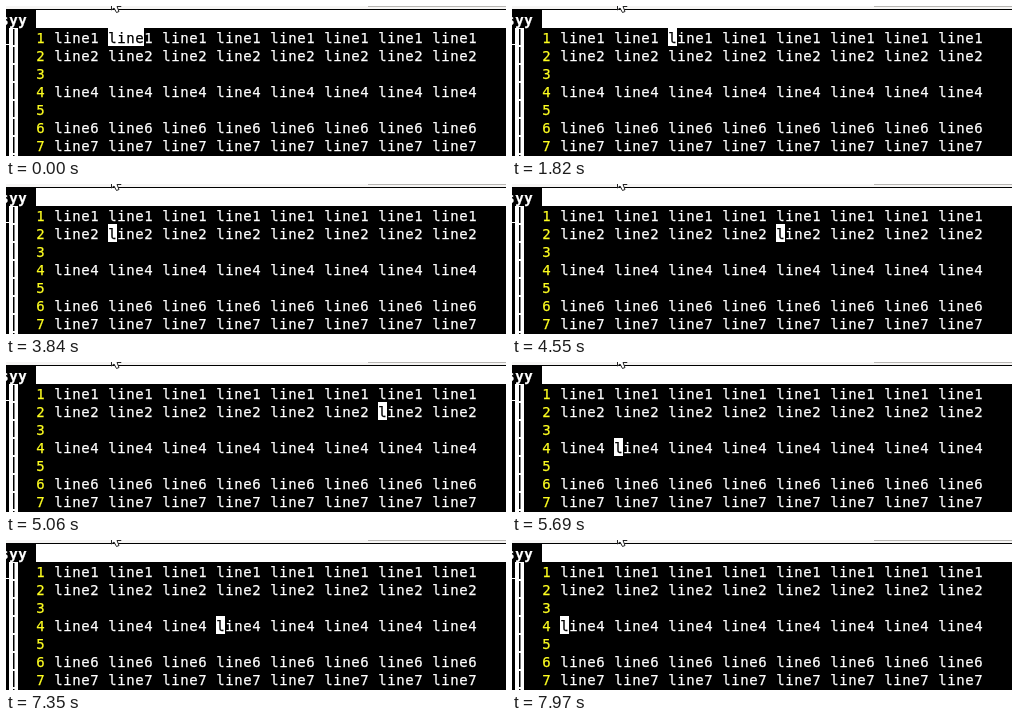
An HTML page with a canvas for the animation above (8 s loop, 500 px wide and 150 px high).

```html
<!DOCTYPE html>
<html lang="en">
<head>
<meta charset="utf-8">
<title>Word motions in a terminal editor</title>
<style>
  html, body { margin: 0; width: 100%; height: 100%; overflow: hidden; background: #000; }
  canvas { display: block; }
</style>
</head>
<body>
<canvas id="stage" width="500" height="150"></canvas>
<script>
const ctx = document.getElementById('stage').getContext('2d');
const LOOP = 8000, CELL = 9, ROW = 18, LEFT = 48, TOP = 22, BASE = 15;
const FONT = '14px "DejaVu Sans Mono", monospace';
const WORDS = 8, WORD_WIDTH = 6 * CELL;
const filledLines = [1, 2, 4, 6, 7];

// Key points [ms, word index]; the cursor steps evenly between them.
const keys = [
  [0, 1], [1820, 2], [2200, 3], [3040, 6], [3840, 9],
  [4550, 12], [5690, 17], [6540, 21], [7100, 20], [7970, 16]
];

const lineTop = line => TOP + (line - 1) * ROW;
const wordLeft = word => LEFT + word * WORD_WIDTH;

function wordIndex(time) {
  const i = keys.findLastIndex(key => key[0] <= time);
  const [start, from] = keys[i];
  const [end, to] = keys[i + 1] || [LOOP, from];
  return from + Math.trunc((to - from) * (time - start) / (end - start));
}

// The first word is selected, then only its first letter, then nothing.
function cursorCells(time) {
  if (time < 720) return 4;
  return time >= 1270 && time < 1820 ? 0 : 1;
}

function rect(x, y, w, h, color) {
  ctx.fillStyle = color;
  ctx.fillRect(x, y, w, h);
}

// Each glyph sits centred in its own terminal cell.
function type(text, x, y, color, bold) {
  ctx.font = (bold ? 'bold ' : '') + FONT;
  ctx.textAlign = 'center';
  ctx.fillStyle = ctx.strokeStyle = color;
  ctx.lineWidth = 0.25;
  [...text].forEach((ch, i) => {
    const center = x + (i + 0.5) * CELL;
    ctx.fillText(ch, center, y + BASE);
    ctx.strokeText(ch, center, y + BASE);
  });
}

function drawPointer() {
  ctx.beginPath();
  ctx.moveTo(105.5, -2);
  ctx.lineTo(105.5, 4);
  ctx.lineTo(108, 2);
  ctx.lineTo(110.5, 6.5);
  ctx.lineTo(113, 5.5);
  ctx.lineTo(111, 0.5);
  ctx.lineTo(115, 0.5);
  ctx.lineTo(115, -2);
  ctx.fillStyle = '#fff';
  ctx.fill();
  ctx.strokeStyle = '#222';
  ctx.lineWidth = 1;
  ctx.stroke();
}

function drawWindow() {
  rect(0, 0, 500, 150, '#000');
  rect(0, 0, 500, 3, '#f6f5f4');
  rect(362, 0, 138, 1, '#b8b6b3');
  rect(30, 4, 470, TOP - 4, '#fff');
  type('syy', -6, 4, '#fff', true);
  drawPointer();

  rect(0, 38, 3, 1, '#fff');
  rect(3, TOP, CELL, 150 - TOP, '#fff');
  for (let line = 1; line <= 8; line++) rect(7, lineTop(line) + 1, 1.5, 16, '#000');
}

function drawText() {
  for (let line = 1; line <= 7; line++) type(String(line), 30, lineTop(line), '#ffff20');
  for (const line of filledLines) {
    for (let word = 0; word < WORDS; word++) {
      type('line' + line, wordLeft(word), lineTop(line), '#fff');
    }
  }
}

function drawCursor(time) {
  const index = wordIndex(time), cells = cursorCells(time);
  const x = wordLeft(index % WORDS);
  const y = lineTop(filledLines[Math.floor(index / WORDS)]);
  rect(x, y, cells * CELL, ROW, '#fff');
  type('line'.slice(0, cells), x, y, '#000');
}

function frame() {
  drawWindow();
  drawText();
  drawCursor(performance.now() % LOOP);
  requestAnimationFrame(frame);
}
frame();
</script>
</body>
</html>
```
